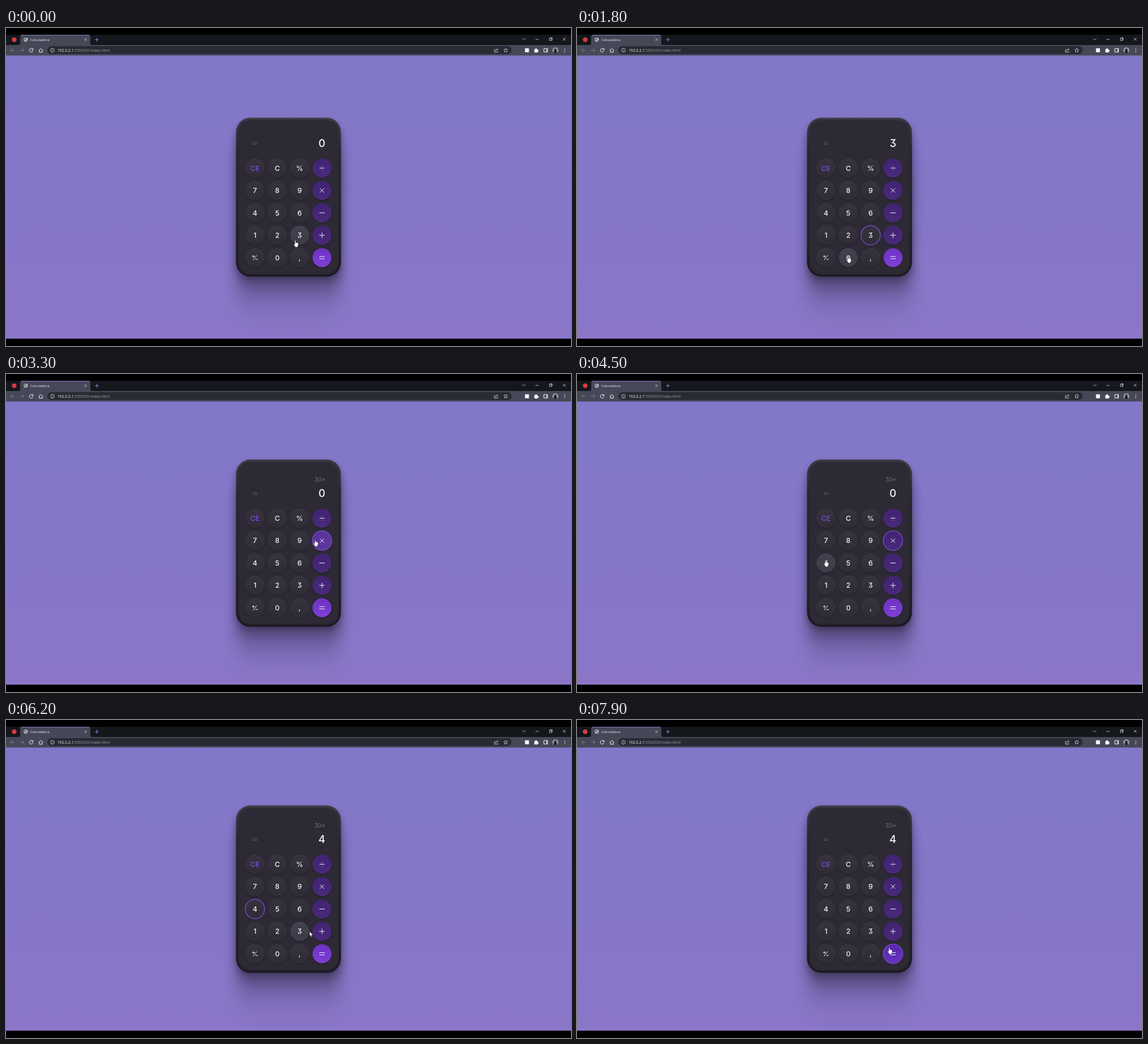
Recreate the animation shown at these times as an HTML page. Size 998 by 561 pixels, loop 8 s.

```html
<!DOCTYPE html>
<html lang="pt">
<head>
<meta charset="utf-8">
<title>Calculadora</title>
<style>
  html, body { margin: 0; width: 100%; height: 100%; overflow: hidden; background: #000; }
  svg { position: absolute; left: 0; top: 0; }
  text { font-family: Inter, sans-serif; font-feature-settings: "cv09"; font-weight: 500; fill: #f6f5f8; }
  .ui { font-family: "Open Sans", sans-serif; }
  .line { fill: none; stroke: #f6f5f8; stroke-width: 1; }
  .thin { fill: none; stroke: #d4d4da; stroke-width: .85; }
  .dim { stroke: #85868f; }
  .end { text-anchor: end; }
</style>
</head>
<body>
<svg id="stage" width="998" height="561">
  <defs>
    <linearGradient id="page" x2="0" y2="1"><stop stop-color="#8078c8"/><stop offset="1" stop-color="#8b76c8"/></linearGradient>
    <linearGradient id="plain" x2="0" y2="1"><stop stop-color="#36333e"/><stop offset="1" stop-color="#2f2c38"/></linearGradient>
    <linearGradient id="op" x2="0" y2="1"><stop stop-color="#422273"/><stop offset="1" stop-color="#48297a"/></linearGradient>
    <linearGradient id="eq" x2="0" y2="1"><stop stop-color="#7030c4"/><stop offset="1" stop-color="#7d40d6"/></linearGradient>
    <linearGradient id="rim" x2="0" y2="1">
      <stop stop-color="#fff" stop-opacity=".1"/><stop offset=".2" stop-opacity=".12"/><stop offset="1" stop-opacity=".45"/>
    </linearGradient>
    <clipPath id="inside"><rect class="body"/></clipPath>
  </defs>
  <rect y="48" width="998" height="500" fill="url(#page)"/>
  <rect y="12" width="998" height="18" fill="#14171c"/>
  <rect y="30" width="998" height="18.5" fill="#464858"/>
  <path fill="#464858" d="M22 30Q25 30 25 27V15Q25 12 28 12H146Q149 12 149 15V27Q149 30 152 30Z"/>
  <path stroke="#817ac3" d="M27 12.6H147"/>
  <rect x="73" y="32" width="820" height="14" rx="7" fill="#292b34"/>
  <text class="ui" x="43" y="22.9" font-size="6.1">Calculadora</text>
  <text class="ui" x="91" y="41.5" font-size="6.75">192.0.2.1<tspan fill="#9b9ca4" font-weight="400">:5500/05/index.html</tspan></text>
  <g id="icons"></g>
  <g id="card"></g>
  <g id="panel">
    <g id="keys"></g>
    <path class="line" style="stroke:#6b6874;stroke-width:.8" d="M435.6 202.2h8.4m-8.4 2.8h8.4"/>
    <text id="value" class="end" x="563.9" y="210.1" font-size="18.6"></text>
    <text id="history" class="end" x="564" y="183" font-size="10.3" style="fill:#6f6c78;font-weight:400"></text>
  </g>
  <path id="cursor" fill="#fff" stroke="#17151d" stroke-width=".6" stroke-linejoin="round"/>
</svg>
<script>
const $ = id => document.getElementById(id);
const LOOP = 8000, STEP = 100, FADE = 200;
const RADIUS = 16.63, PITCH = 39.5, LEFT = 439.7, TOP = 247.1, GROW = 7.35;

// Shapes
const cross = (x, y, r) => `M${x - r} ${y - r}l${2 * r} ${2 * r}m0 ${-2 * r}l${-2 * r} ${2 * r}`;
const dash = (x, y, r) => `M${x - r} ${y}h${2 * r}`;
const plus = (x, y, r) => dash(x, y, r) + `M${x} ${y - r}v${2 * r}`;
const stroke = (d, cls = 'thin') => `<path class="${cls}" d="${d}"/>`;
const dot = (x, y, r, fill) => `<circle cx="${x}" cy="${y}" r="${r}" fill="${fill}"/>`;
const box = (x, y, size, fill) => `<rect x="${x}" y="${y}" width="${size}" height="${size}" fill="${fill}"/>`;
const backArrow = (x, dir) => `M${x + 3.3 * dir} 39.3h${-6.6 * dir}m${3.2 * dir}-3.2l${-3.2 * dir} 3.2 ${3.2 * dir} 3.2`;

function star(x, y, r) {
  const points = Array.from({ length: 10 }, (_, i) => {
    const a = i * Math.PI / 5, size = i % 2 ? r * .5 : r;
    return [x + size * Math.sin(a), y - size * Math.cos(a)];
  });
  return `M${points.join('L')}Z`;
}

$('icons').innerHTML = [
  dot(14.5, 20.6, 4.2, '#d93b42'),
  dot(35, 20.6, 3.7, '#b5b6bd'), dot(33.9, 20, 1.4, '#595a66'), dot(36.7, 22.2, 1, '#595a66'),
  stroke(cross(140.5, 20.6, 2) + cross(986, 19.8, 2.4) + dash(938.2, 20.2, 2.8) + 'M911.7 18.3l2.8 2.8 2.8-2.8'),
  stroke('M959.9 18.3h3.8v3.8h-3.8zM961 18.2v-1.1h3.8v3.9h-1'),
  `<g style="stroke:#8b83d2">${stroke(plus(160.5, 20.6, 3.5), 'new')}</g>`,
  stroke(backArrow(11.5, 1) + backArrow(28.2, -1), 'thin dim'),
  stroke('M47.3 37.7a3.2 3.2 0 1 0 .3 2.4M47.9 35.7v2.5h-2.6', 'line'),
  stroke('M57.8 39.5l3.7-3.4 3.7 3.4M59 38.8v4h5v-4', 'line'),
  stroke('M78.6 39.3a3.4 3.4 0 1 0 6.8 0 3.4 3.4 0 1 0-6.8 0M82 38.9v2.3M82 37.1v.8'),
  stroke('M864.6 38h-1.8v4.6h6v-1.7M864.7 41q.4-3.3 4.2-3.4l-1.7-1.7m1.7 1.7l-1.7 1.7'),
  stroke(star(882.7, 39.4, 3.7)),
  box(916.7, 35.8, 7, '#f6f5f8'),
  box(933.3, 37.2, 6, '#f6f5f8'), dot(936.3, 37, 1.3, '#f6f5f8'), dot(939.6, 40.2, 1.3, '#f6f5f8'),
  stroke('M950 36.3h6.5v6h-6.5zM955 36.3v6', 'line'),
  dot(970.4, 39.3, 5.3, '#92949b'), dot(970.3, 38.4, 2, '#1c1d22'), dot(970.3, 42, 2.6, '#1c1d22'),
  ...[-1, 0, 1].map(i => dot(987, 39.4 + 2.6 * i, .75, '#f6f5f8'))
].join('');

const signs = {
  '÷': dash(0, 0, 4.4) + 'M-.5-3.3h1M-.5 3.3h1',
  '×': cross(0, 0, 3.7),
  '−': dash(0, 0, 4.8),
  '+': plus(0, 0, 4.8),
  '=': dash(0, -2, 4.8) + dash(0, 2, 4.8),
  '±': plus(-2.8, -2.2, 2.1) + dash(2.9, 3, 2.1) + 'M-3.2 4.3L3.2-4.2'
};
const hand = 'M-.9 1Q0-.9.9 1V4Q2 3.3 2.4 4.3 3.5 3.7 3.9 4.8 5 4.4 5.4 5.6V8.4L4.3 11V12.3H-.3V11.3L-2.9 7.4Q-3.1 6.1-1.9 6.3L-.9 7.2Z';
const arrow = 'M0 0V8.7L2 6.9 3.3 9.8 4.8 9.2 3.5 6.3H6.2Z';

// Card: stacked shadows, then the body with a shaded rim
const shade = (offset, blur, alpha) =>
  `<rect class="body" transform="translate(0 ${offset})" style="filter:blur(${blur / 2}px)" opacity="${alpha}"/>`;
$('card').innerHTML = shade(81, 32, .04) + shade(46, 27, .13) + shade(20, 20, .23) + shade(5, 11, .26) +
  `<rect class="body" fill="#2d2a36"/>
   <g clip-path="url(#inside)"><rect class="body" fill="none" stroke="url(#rim)" stroke-width="7" style="filter:blur(1.8px)"/></g>`;
const bodies = document.querySelectorAll('.body');
for (const b of bodies) for (const [k, v] of Object.entries({ x: 406.45, width: 185.1, rx: 25 })) b.setAttribute(k, v);

// Keys
const looks = { plain: ['#cbc4ea', .09], op: ['#8c55e6', .32], eq: ['#1e0a78', .25] };
const keys = [...'EC%÷789×456−123+±0,='].map((name, i) => {
  const el = document.createElementNS('http://www.w3.org/2000/svg', 'g');
  const x = LEFT + i % 4 * PITCH, y = TOP + (i >> 2) * PITCH;
  const look = name === '=' ? 'eq' : i % 4 === 3 ? 'op' : 'plain';
  const [tint, strength] = looks[look];
  const face = signs[name] ? stroke(signs[name], 'line')
    : `<text text-anchor="middle" y="4.4" font-size="12.3" ${i ? '' : 'style="fill:#8249e3"'}>${i ? name : 'CE'}</text>`;
  el.setAttribute('transform', `translate(${x} ${y})`);
  el.innerHTML = `<circle cy="1.8" r="${RADIUS}" opacity=".2" style="filter:blur(1.6px)"/>
    <circle r="${RADIUS}" fill="url(#${look})"/>
    <circle class="glow" r="${RADIUS}" fill="${tint}"/>
    <circle r="${RADIUS - .4}" fill="none" stroke="#fff" stroke-opacity=".04" stroke-width=".8"/>
    ${face}<circle class="ring" r="${RADIUS + .5}" fill="none" stroke="#8a52e6" stroke-width="1.1"/>`;
  $('keys').append(el);
  return { name, x, y, strength, glow: el.querySelector('.glow'), ring: el.querySelector('.ring') };
});

// Clicks: the ring shows on press, the result one step later
const clicks = [[1200, '3'], [2000, '0'], [3100, '×'], [5200, '4'], [7900, '=']];
function calculate(t) {
  let value = '0', history = '';
  for (const [time, key] of clicks) {
    if (time + STEP > t) break;
    if (key === '×') [history, value] = [value + '*', '0'];
    else if (key !== '=') value = value === '0' ? key : value + key;
  }
  return { value, history, shift: history ? GROW : 0 };
}

// Pointer moves: start, end, x, y; each one slows down towards its end
const moves = [
  [0, 0, 511, 374.5], [0, 300, 513.5, 372], [400, 900, 510, 370], [1300, 1750, 479, 402.3],
  [2300, 3200, 546, 292], [3600, 4300, 439, 328], [4700, 5000, 442, 326.6],
  [5700, 6580, 544.5, 377], [6580, 6800, 553, 368.5], [6900, 7700, 551.5, 401]
];
function pointer(t) {
  let [, , x, y] = moves[0];
  for (const [start, end, toX, toY] of moves.slice(1)) {
    if (t <= start) break;
    const f = 1 - (1 - Math.min(1, (t - start) / (end - start))) ** 3;
    x += (toX - x) * f;
    y += (toY - y) * f;
  }
  return [x, y];
}

function hits(key, t) {
  const [x, y] = pointer(t);
  return Math.hypot(x - key.x, y - key.y - calculate(t).shift) < RADIUS;
}

// share of the fade window spent over the key
function glow(key, t) {
  let n = 0;
  for (let i = 1; i <= 10; i++) n += hits(key, t - FADE * i / 10);
  return n / 10;
}

function draw(t) {
  const { value, history, shift } = calculate(t);
  const focused = clicks.findLast(c => c[0] <= t)?.[1];
  for (const b of bodies) {
    b.setAttribute('y', 158.2 - shift);
    b.setAttribute('height', 280.3 + 2 * shift);
  }
  for (const key of keys) {
    key.glow.setAttribute('opacity', glow(key, t) * key.strength);
    key.ring.setAttribute('visibility', key.name === focused ? 'visible' : 'hidden');
  }
  $('panel').setAttribute('transform', `translate(0 ${shift})`);
  $('value').textContent = value;
  $('history').textContent = history;
  $('cursor').setAttribute('d', keys.some(key => hits(key, t)) ? hand : arrow);
  $('cursor').setAttribute('transform', `translate(${pointer(t)})`);
}

const start = performance.now();
function tick() {
  const t = (performance.now() - start) % LOOP;
  draw(Math.floor(t / STEP) * STEP);
  requestAnimationFrame(tick);
}
tick();
</script>
</body>
</html>
```
